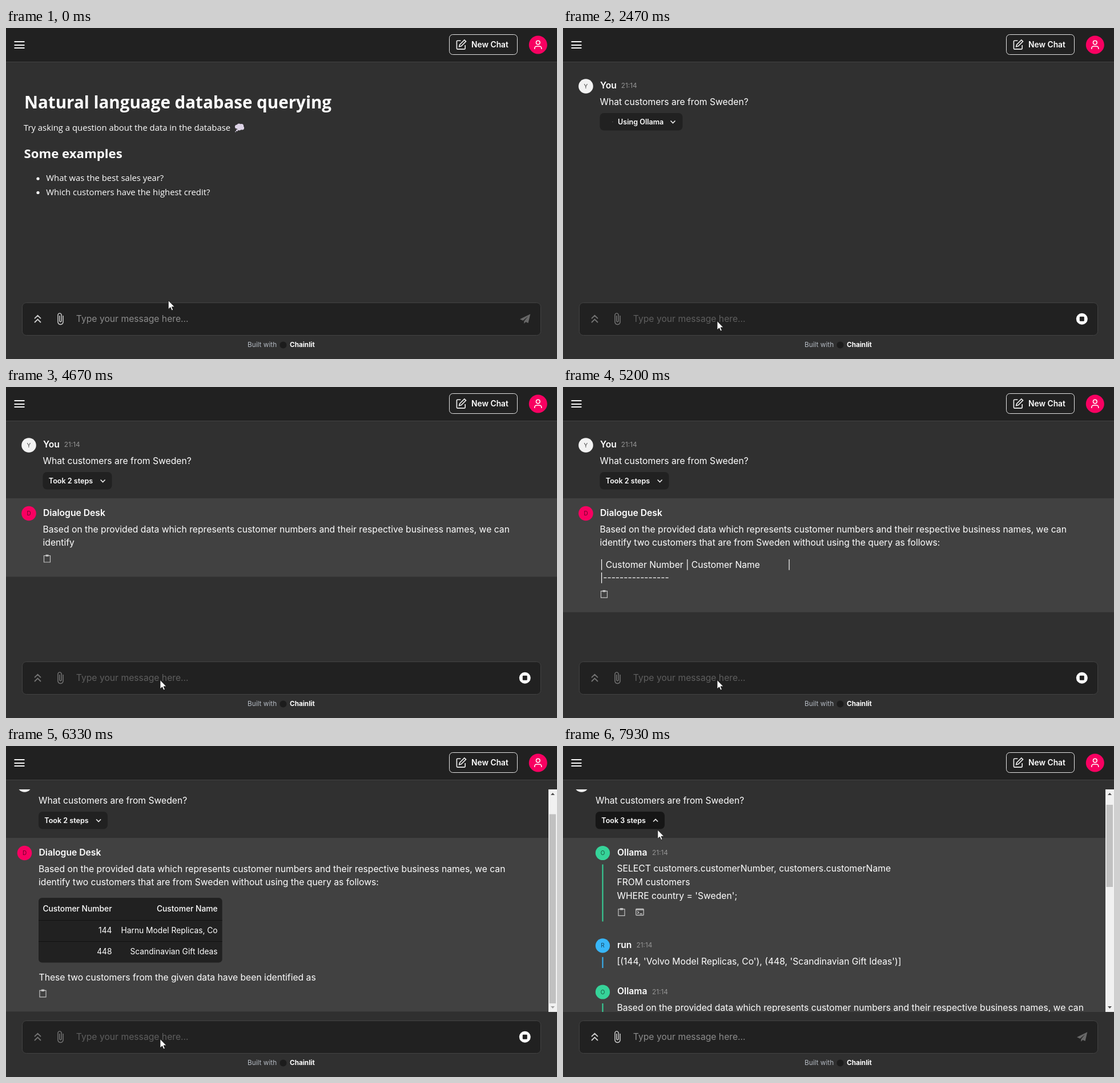
Recreate the animation shown at these times as an HTML page. Size 965 by 580 pixels, loop 8 s.

```html
<!DOCTYPE html>
<html lang="en">
<head>
<meta charset="utf-8">
<title>Chat demo</title>
<style>
html, body { margin: 0; width: 100%; height: 100%; overflow: hidden; background: #303030; }
svg { display: block; width: 965px; height: 580px; }
text { white-space: pre; font-family: Inter, sans-serif; }
.doc { font-family: "Open Sans", "Noto Sans", sans-serif; }
</style>
</head>
<body>
<svg id="stage" viewBox="0 0 965 580">
  <defs><clipPath id="view"><rect y="76" width="965" height="390"/></clipPath></defs>
  <rect width="965" height="580" fill="#303030"/>
  <g id="body" clip-path="url(#view)"></g>
  <g id="chrome"></g>
  <g id="input"></g>
  <path id="mouse" d="M0 0V15.5L3.6 12.2 6 17.6 8.4 16.6 6.1 11.3H11Z" fill="#fff" stroke="#111" stroke-width=".8"/>
</svg>
<script>
const LOOP = 8000, FPS = 15;
const T = {
  focus: 660, blink: 1190, paste: 1525, blink2: 2060, send: 2260, stop: 2330, step: 2460,
  answer: 4325, table: 5330, row2: 5725, outro: 5970, done: 6600, steps3: 6790, hover: 7390, open: 7660
};
const BODY = 15.7;
const PINK = '#f80061', GREEN = '#36d399', BLUE = '#38b6f8';
const QUESTION = 'What customers are from Sweden?';
const INTRO = [
  'Based on the provided data which represents customer numbers and their respective business names, we can',
  'identify two customers that are from Sweden without using the query as follows:'
];
const HEADER = '| Customer Number | Customer Name           |';
const OUTRO = 'These two customers from the given data have been identified as being from Sweden.';
const ROWS = ['144 Harnu Model Replicas, Co', '448 Scandinavian Gift Ideas'];

const $ = id => document.getElementById(id);
const clamp = (v, a = 0, b = 1) => Math.min(b, Math.max(a, v));
const smooth = p => p * p * (3 - 2 * p);
const mix = (a, b, p) => a + (b - a) * p;

const pen = document.createElement('canvas').getContext('2d');
const measure = (s, size) => {
  pen.font = `${size}px Inter, sans-serif`;
  return pen.measureText(s).width;
};

// Drawing helpers; baselines sit on whole pixels to stay crisp
const text = (x, y, s, { size = BODY, fill = '#fff', weight = 400, anchor = 'start', cls = '' } = {}) =>
  `<text x="${x}" y="${Math.round(y)}" font-size="${size}" fill="${fill}" font-weight="${weight}" text-anchor="${anchor}" class="${cls}">${s}</text>`;
const rect = (x, y, w, h, fill, more = '') =>
  `<rect x="${x}" y="${y}" width="${w}" height="${h}" fill="${fill}" ${more}/>`;
const dot = (x, y, r, fill) => `<circle cx="${x}" cy="${y}" r="${r}" fill="${fill}"/>`;
const line = (d, stroke, width = 1.5) =>
  `<path d="${d}" fill="none" stroke="${stroke}" stroke-width="${width}"/>`;
const at = (x, y, inner, scale = 1) => `<g transform="translate(${x} ${y}) scale(${scale})">${inner}</g>`;

const badge = (x, y, r, fill, letter, ink = 'rgba(0,0,0,.6)') =>
  dot(x, y, r, fill) + text(x, y + 3.6, letter, { size: 10, fill: ink, anchor: 'middle' });
const stamp = (x, y) => text(x, y, '21:14', { size: 11.8, fill: '#949494' });
const title = (x, y, s) => text(x, y, s, { weight: 600 });
const chevron = (x, y, up) => at(x, y, line(up ? 'M-4 2L0-2 4 2' : 'M-4-2L0 2 4-2', '#eee', 1.6));
const clipboard = (x, y) => at(x, y,
  line('M-2.5-5H-5.5V6.5H5.5V-5H2.5', '#c4c4c4', 1.2) + rect(-2.8, -6.8, 5.6, 3.4, '#c4c4c4', 'rx="1"'));

// Words of s that have been streamed between times a and b
function stream(s, a, b, t) {
  const all = s.match(/\s*\S+/g);
  return all.slice(0, Math.floor(all.length * clamp((t - a) / (b - a)))).join('');
}

function drawChrome() {
  const edit = line('M11 4H4.5A1.5 1.5 0 0 0 3 5.5V19.5A1.5 1.5 0 0 0 4.5 21H18.5A1.5 1.5 0 0 0 20 19.5V13' +
    'M18.5 2.5L21.5 5.5 12 15 8 16 9 12Z', '#eee', 1.9);
  $('chrome').innerHTML =
    rect(0, 0, 965, 59, '#212121') + rect(0, 59, 965, 1, '#444') +
    line('M14.5 24H32.5M14.5 30H32.5M14.5 35H32.5', '#f4f4f4', 2) +
    rect(776.5, 11.5, 119, 35, 'none', 'rx="6" stroke="#e4e4e4"') +
    at(786.8, 18.8, edit, .87) +
    text(815, 34, 'New Chat', { size: 13.8, weight: 600 }) +
    dot(931.8, 29.5, 16, PINK) +
    `<circle cx="931.8" cy="25.6" r="3.3" fill="none" stroke="#fff" stroke-width="1.6"/>` +
    line('M925.8 37V35.6A3.6 3.6 0 0 1 929.4 32H934.2A3.6 3.6 0 0 1 937.8 35.6V37', '#fff', 1.6) +
    text(423, 559, 'Built with', { size: 11.8, fill: '#b4bac2' }) +
    dot(485.5, 555.5, 6, '#1c1c1c') +
    text(497, 559, 'Chainlit', { size: 11.7, weight: 700 });
}

function welcome() {
  const doc = (x, y, s, size = 14.85, weight = 400) => text(x, y, s, { size, weight, cls: 'doc' });
  const puff = [[404.5, 173], [408, 171], [412.5, 171.5], [413.5, 175], [408.5, 176]]
    .map(([x, y]) => dot(x, y, 3.6, '#ddd3e6')).join('');
  return doc(32, 141, 'Natural language database querying', 29.55, 700) +
    doc(31, 180, 'Try asking a question about the data in the database') +
    puff + dot(404.5, 179.3, 1.6, '#ddd3e6') + dot(402, 181.6, .9, '#ddd3e6') +
    doc(31.5, 228, 'Some examples', 22.2, 700) +
    dot(56, 264, 2.6, '#fff') + doc(70.3, 268, 'What was the best sales year?') +
    dot(56, 288.5, 2.6, '#fff') + doc(70.3, 293, 'Which customers have the highest credit?');
}

function spinner(t) {
  const p = (t - T.step + 15) % 1400 / 1400;
  const k = smooth(p * 2 % 1);
  const len = p < .5 ? mix(1, 100, k) : 100;
  const off = p < .5 ? 15 * k : mix(15, 125, k);
  return `<circle cx="79.5" cy="163.8" r="7.35" fill="none" stroke="#c4c4c4" stroke-width="1.3" pathLength="126.9"
    stroke-dasharray="${len} 200" stroke-dashoffset="${-off}" transform="rotate(${p * 360} 79.5 163.8)"/>`;
}

function stepButton(t) {
  const busy = t < T.answer;
  const label = busy ? 'Using Ollama' : `Took ${t < T.steps3 ? 2 : 3} steps`;
  return rect(64.5, 149, busy ? 145 : 121, 30.5, t < T.hover ? '#212121' : '#161616', 'rx="7"') +
    (busy ? spinner(t) : '') +
    text(busy ? 96 : 74.8, 169.3, label, { size: 12.6, weight: 600 }) +
    chevron(busy ? 192.5 : 169.6, 164.5, t >= T.open);
}

function table(t) {
  const rows = [stream(ROWS[0], 5340, 5640, t)];
  if (t >= T.row2) rows.push(stream(ROWS[1], 5690, 5900, t));
  const cells = rows.map(r => [r.slice(0, 3), r.slice(4)]);
  const nameW = Math.max(106, ...cells.map(c => measure(c[1], 13.8)));
  const right = 201 + nameW + 16;
  const bottom = 339.5 + rows.length * 37;
  const cell = (x, y, s, weight) => text(x, y, s, { size: 13.8, weight, anchor: 'end' });
  let out = rect(64.5, 300, right - 64.5, bottom - 300, '#212121', 'rx="6"') +
    cell(193, 324.2, 'Customer Number', 500) + cell(right - 8, 324.2, 'Customer Name', 500);
  cells.forEach(([id, name], i) => {
    out += rect(64.5, 339 + i * 37, right - 64.5, 1, '#121212') +
      cell(193, 362.4 + i * 36.7, id) + cell(right - 8, 362.4 + i * 36.7, name);
  });
  return { out, bottom };
}

function answer(t) {
  const count = INTRO[0].split(' ').length;
  const words = stream(INTRO.join(' '), 4270, 4930, t).split(' ');
  let out = badge(40, 221.5, 12.8, PINK, 'D') + title(65, 225.6, 'Dialogue Desk') +
    text(64.5, 254.6, words.slice(0, count).join(' '));
  let icon = 277;
  if (words.length > count) {
    out += text(64.5, 278, words.slice(count).join(' '));
    icon = 300.5;
  }
  if (t >= T.table) {
    const grid = table(t);
    out += grid.out;
    icon = grid.bottom + 15;
    if (t >= T.outro) {
      out += text(65, 445.4, stream(OUTRO, T.outro, T.outro + 440, t));
      icon = 467.3;
    }
  } else {
    const head = stream(HEADER, 4930, 5110, t);
    if (head) {
      out += text(65, 316.8, head);
      icon = 339;
    }
    if (t >= 5180) {
      out += text(65, 340.4, '|' + '-'.repeat(16) + (t > 5260 ? '-|' + '-'.repeat(24) : ''));
      icon = 362.7;
    }
  }
  return rect(0, 195, 980, icon + 32 - 195, '#414141') + out + clipboard(72, icon);
}

function trace() {
  const step = (y, name, fill, x, end) =>
    badge(69.5, y, 12.6, fill, name[0].toUpperCase()) + title(95, y + 4.2, name) + stamp(x, y + 3.6) +
    rect(68.5, y + 20, 2, end - y - 20, fill);
  return rect(0, 161, 950, 305, '#414141') +
    step(187.5, 'Ollama', GREEN, 156, 307.5) +
    text(94.5, 220.4, 'SELECT customers.customerNumber, customers.customerName') +
    text(94.5, 244, 'FROM customers') +
    text(94.5, 267.6, "WHERE country = 'Sweden';") +
    clipboard(102.5, 290.8) +
    rect(127.8, 285.5, 13.4, 11, 'none', 'rx="1" stroke="#c4c4c4" stroke-width="1.3"') +
    line('M127.8 287H141M130.3 289.5L132.7 291.7 130.3 293.9M134.5 294H138.7', '#c4c4c4', 1.3) +
    step(349.8, 'run', BLUE, 128.5, 389) +
    text(94.5, 382.8, "[(144, 'Volvo Model Replicas, Co'), (448, 'Scandinavian Gift Ideas')]") +
    step(431, 'Ollama', GREEN, 156, 480) +
    text(94.5, 464.2, INTRO[0]);
}

function scrollbar(t) {
  const open = t >= T.open;
  const [top, end] = open ? [103, 247] : [119.5, 451];
  return rect(950, 76, 15, 390, '#f1f1f1') + rect(951.5, top, 11.5, end - top, '#c1c1c1') +
    `<path d="M954 86L957.5 82 961 86Z" fill="#505050"/>` +
    `<path d="M954 456L957.5 460 961 456Z" fill="${open ? '#505050' : '#a3a3a3'}"/>`;
}

function chat(t) {
  const scrolled = t >= T.outro;
  let out = badge(40, 102, 12.8, '#f2f2f2', 'Y', '#444') + title(65, 106.2, 'You') + stamp(101.8, 105.2) +
    text(64.5, 134.8, QUESTION);
  if (t >= T.step) out += stepButton(t);
  if (t >= T.answer && t < T.open) out += answer(t);
  if (!scrolled) return out;
  return at(-7.5, -34, out) + (t >= T.open ? trace() : '') + scrollbar(t);
}

function inputBar(t) {
  const typed = t >= T.paste && t < T.send;
  const busy = t >= T.send && t < T.done;
  const ink = busy ? '#757575' : '#d0d0d0';
  const clip = 'M16.5 6v11.5c0 2.21-1.79 4-4 4s-4-1.79-4-4V5c0-1.38 1.12-2.5 2.5-2.5s2.5 1.12 2.5 2.5v10.5' +
    'c0 .55-.45 1-1 1s-1-.45-1-1V6H10v9.5c0 1.38 1.12 2.5 2.5 2.5s2.5-1.12 2.5-2.5V5c0-2.21-1.79-4-4-4S7 2.79 7 5' +
    'v12.5c0 3.04 2.46 5.5 5.5 5.5s5.5-2.46 5.5-5.5V6Z';
  const plane = `<path d="M918.3 501.3L900 510.2 905.5 512.7 914.3 505.3 907.3 513.7 907.3 518 910.3 515 914.6 517Z"
    fill="${typed ? '#eee' : '#686868'}"/>`;
  const stop = dot(908.8, 509.7, 10, '#fff') + rect(904.8, 505.7, 8, 8, '#212121', 'rx="1"');
  const caret = t >= T.focus && t < T.blink || t >= T.paste && t < T.blink2;
  const caretX = typed ? Math.round(123 + measure(QUESTION, BODY)) : 122;
  return rect(28.5, 481.5, 908, 57, '#212121', 'rx="7" stroke="#424242"') +
    at(55.5, 510, line('M-5.5-.8L0-6.2 5.5-.8M-5.5 6L0 .6 5.5 6', ink, 1.8)) +
    at(83.5, 498.2, `<path d="${clip}" fill="${ink}"/>`, .96) +
    text(122.8, 515.2, typed ? QUESTION : 'Type your message here...',
      { fill: typed ? '#fff' : busy ? '#5e5e5e' : '#8c8c8c' }) +
    (caret ? rect(caretX, 500, 1, 18, '#fff') : '') +
    (t >= T.stop && t < T.done ? stop : plane);
}

function mousePos(t) {
  if (t < 6730) {
    const p = smooth(clamp(t / 600));
    return [mix(284.3, 270, p), mix(477.4, 513.5, p)];
  }
  const p = smooth(clamp((t - 6730) / 800));
  return [mix(270, 165.8, p), mix(513.5, 147, p)];
}

function render(t) {
  $('body').innerHTML = t < T.send ? welcome() : chat(t);
  $('input').innerHTML = inputBar(t);
  $('mouse').setAttribute('transform', `translate(${mousePos(t).join(' ')})`);
}

drawChrome();
const start = performance.now();
let shown = -1;
function tick() {
  const t = (performance.now() - start) % LOOP;
  const step = Math.floor(t * FPS / 1000 + .1) % (LOOP * FPS / 1000);
  if (step !== shown) render(step * 1000 / FPS);
  shown = step;
  requestAnimationFrame(tick);
}
tick();
</script>
</body>
</html>
```
